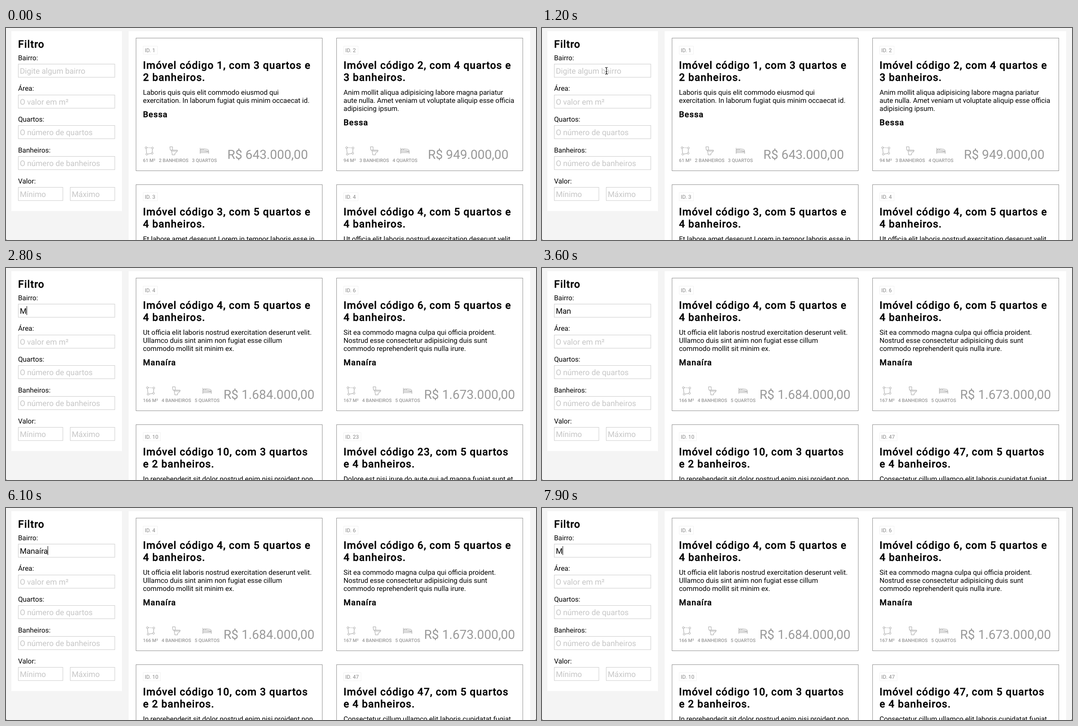
These frames come from a looping animation (1184 by 473 pixels, 8 s). An HTML page:

```html
<!DOCTYPE html>
<html lang="pt-BR">
<head>
<meta charset="utf-8">
<title>Filtro de imóveis</title>
<style>
  html, body { margin: 0; width: 100%; height: 100%; overflow: hidden; background: #f4f4f4; }
  svg { display: block; width: 1184px; height: 473px; font-family: Roboto, sans-serif; }
  text { white-space: pre; font-size: 15.43px; fill: #000; text-rendering: geometricPrecision; }
  .title, .area { font-weight: 500; letter-spacing: .965px; stroke: #000; stroke-width: .4px; }
  .title { font-size: 23.16px; }
  .area { font-size: 18.4px; }
  .input { font-size: 17.2px; }
  .hint { font-size: 17.37px; fill: #c6c6c6; }
  .id { font-size: 12px; fill: #888; }
  .fact { font-size: 10.5px; font-weight: 500; fill: #999; }
  .price { font-size: 28.2px; fill: #999; }
  .icon { fill: none; stroke: #a2a2a2; stroke-width: 1; }
</style>
</head>
<body>
<svg id="stage" viewBox="0 0 1184 473"></svg>
<script>
const LOOP = 8000;
const stage = document.getElementById('stage');

function add(parent, tag, attrs = {}, content) {
  const el = document.createElementNS('http://www.w3.org/2000/svg', tag);
  for (const k in attrs) el.setAttribute(k, attrs[k]);
  if (content !== undefined) el.textContent = content;
  parent.appendChild(el);
  return el;
}
const group = (parent, x = 0, y = 0) => add(parent, 'g', { transform: `translate(${x} ${y})` });
const label = (parent, cls, x, y, str) => add(parent, 'text', { class: cls, x, y }, str);
const box = (parent, x, y, width, height, stroke) =>
  add(parent, 'rect', { x, y, width, height, fill: '#fff', stroke: stroke || 'none' });
const show = (el, on) => el.setAttribute('visibility', on ? 'visible' : 'hidden');

// Icons are drawn around their own centre
const ICONS = [
  g => {
    const pts = [[-7, -7], [7.4, -6.4], [6.8, 5.6], [-5.4, 7.6]];
    add(g, 'path', { d: 'M-4.8-7.2L5.2-6.6', 'stroke-dasharray': '2 1.2' });
    add(g, 'path', { d: 'M7.2-4.2L6.9 3.4M4.6 6L-3.2 7.2M-5.7 5.4L-6.8-4.8' });
    for (const [cx, cy] of pts) add(g, 'circle', { cx, cy, r: 2 });
  },
  g => add(g, 'path', {
    d: 'M-8.5-9H-2.5V-1.5H-7.5ZM-5.5-1.5H8.5V.8H-4.5ZM7.8 .8Q7 4.5 2.8 5.2V9H-3.5V5Q-4.8 3-4.8 .8'
  }),
  g => add(g, 'path', {
    d: 'M-9.5-6.5V6.5M-9.5 4H9.5M9.5 6.5V1.2L-1-1.5H-9.5M-9.5 1.5H9.5M-7.5-1.8V-4.2H-3V-1.8M-2.5-4.5L7-3.2Q9.3-2.6 9.4 1'
  })
];

const LINE = 18.33;

function card(parent, x, y, c) {
  const g = group(parent, x, y);
  box(g, .5, .5, 416, 296, '#909090');

  const badge = box(g, 16.5, 18.5, 32, 18, '#f1f1f1');
  const id = label(g, 'id', 20, 31.7, 'ID. ' + c.id);
  badge.setAttribute('width', id.getComputedTextLength() + 8.5);

  const tail = `${c.baths} banheiros.`;
  const long = c.id > 9;
  label(g, 'title', 16, 69, `Imóvel código ${c.id}, com ${c.rooms} quartos${long ? '' : ' e'}`);
  label(g, 'title', 16, 96, long ? 'e ' + tail : tail);

  c.text.forEach((line, i) => label(g, '', 16, 126.8 + i * LINE, line));
  if (!c.price) return;
  label(g, 'area', 16, 140 + c.text.length * LINE, c.area);

  let left = 16;
  [`${c.size} M²`, `${c.baths} BANHEIROS`, `${c.rooms} QUARTOS`].forEach((str, i) => {
    const w = label(g, 'fact', left, 277.2, str).getComputedTextLength();
    const icon = group(g, left + w / 2, 252);
    icon.setAttribute('class', 'icon');
    ICONS[i](icon);
    left += w + 7.8;
  });
  const price = label(g, 'price', (left - 7.8 + 408) / 2, 270, 'R$ ' + c.price);
  price.setAttribute('text-anchor', 'middle');
}

const HOMES = [
  { id: 1, rooms: 3, baths: 2, size: 61, price: '643.000,00', area: 'Bessa', text: [
    'Laboris quis quis elit commodo eiusmod qui',
    'exercitation. In laborum fugiat quis minim occaecat id.'] },
  { id: 2, rooms: 4, baths: 3, size: 94, price: '949.000,00', area: 'Bessa', text: [
    'Anim mollit aliqua adipisicing labore magna pariatur',
    'aute nulla. Amet veniam ut voluptate aliquip esse officia',
    'adipisicing ipsum.'] },
  { id: 3, rooms: 5, baths: 4, text: ['Et labore amet deserunt Lorem in tempor laboris esse in'] },
  { id: 4, rooms: 5, baths: 4, size: 166, price: '1.684.000,00', area: 'Manaíra', text: [
    'Ut officia elit laboris nostrud exercitation deserunt velit.',
    'Ullamco duis sint anim non fugiat esse cillum',
    'commodo mollit sit minim ex.'] },
  { id: 6, rooms: 5, baths: 4, size: 167, price: '1.673.000,00', area: 'Manaíra', text: [
    'Sit ea commodo magna culpa qui officia proident.',
    'Nostrud esse consectetur adipisicing duis sunt',
    'commodo reprehenderit quis nulla irure.'] },
  { id: 10, rooms: 3, baths: 2, text: ['In reprehenderit sit dolor nostrud enim nisi proident non'] },
  { id: 23, rooms: 5, baths: 4, text: ['Dolore est nisi irure do aute qui ad magna fugiat sunt et'] },
  { id: 47, rooms: 5, baths: 4, text: ['Consectetur cillum ullamco elit laboris cupidatat fugiat'] }
];

function results(...ids) {
  const g = group(stage);
  ids.forEach((id, i) =>
    card(g, 290 + (i % 2) * 448, 22 + (i >> 1) * 327, HOMES.find(h => h.id === id)));
  return g;
}

function field(x, y, w, hint) {
  box(stage, x + .5, y + .5, w, 29.5, '#cbcbcb');
  return label(stage, 'hint', x + 3.9, y + 21.5, hint);
}

// Page
add(stage, 'rect', { width: 1184, height: 473, fill: '#f4f4f4' });
box(stage, 12, 7, 247, 401.5);
box(stage, 274, 7, 897, 466);
label(stage, 'title', 27, 43.6, 'Filtro');

const ROW = 68.75;
const rowY = i => Math.round(79.9 + i * ROW);
['Bairro:', 'Área:', 'Quartos:', 'Banheiros:', 'Valor:'].forEach((s, i) =>
  label(stage, '', 27, 71.5 + i * ROW, s));
const hint = field(27, rowY(0), 215.5, 'Digite algum bairro');
['O valor em m²', 'O número de quartos', 'O número de banheiros'].forEach((s, i) =>
  field(27, rowY(i + 1), 215.5, s));
field(27, rowY(4), 99.5, 'Mínimo');
field(143, rowY(4), 99.5, 'Máximo');

const lists = [
  { from: 0, el: results(1, 2, 3, 4) },
  { from: 2800, el: results(4, 6, 10, 23) },
  { from: 3000, el: results(4, 6, 10, 47) }
];

const typed = label(stage, 'input', 31, 101.5, '');
const caret = add(stage, 'rect', { y: 85, width: 1, height: 20 });

const beam = group(stage);
const BEAM = 'M-3-7.5Q0-7.5 0-5.5Q0-7.5 3-7.5M0-5.5V5.5M-3 7.5Q0 7.5 0 5.5Q0 7.5 3 7.5M-2 2H2';
add(beam, 'path', { d: BEAM, fill: 'none', stroke: '#fff', 'stroke-width': 2.6 });
add(beam, 'path', { d: BEAM, fill: 'none', stroke: '#000', 'stroke-width': 1.2 });
const arrow = group(stage);
add(arrow, 'path', { d: 'M0 0V15L3.5 11.8L6 17.5L8.3 16.5L5.9 11H10.6Z', stroke: '#fff' });

// Rounded window corners
add(stage, 'path', { d: 'M0 470Q0 473 3 473H0ZM1184 470Q1184 473 1181 473H1184Z', fill: '#555' });

// [time, letters in the field]
const WORD = 'Manaíra';
const KEYS = [[1800, 0], [2600, 1], [2900, 2], [3100, 3], [3900, 4], [4500, 5], [4700, 6], [5100, 7],
  [7000, 6], [7200, 5], [7400, 4], [7600, 3], [7800, 2], [7900, 1]];

function pointer(t) {
  if (t >= 1200) return [144, 95.5];
  const rest = (1 - Math.min(1, (t - 100) / 900)) ** 3;
  return [148 + 552 * rest, 104 + 366 * rest];
}

function draw(time) {
  const t = Math.floor(time / 100) * 100;

  const [x, y] = pointer(t);
  const inField = x < 243 && y < 110;
  const visible = t >= 100 && t < 2600;
  beam.setAttribute('transform', `translate(${x} ${y})`);
  arrow.setAttribute('transform', `translate(${x} ${y})`);
  show(beam, visible && inField);
  show(arrow, visible && !inField);

  const key = KEYS.filter(k => k[0] <= t).pop();
  const count = key ? key[1] : 0;
  typed.textContent = WORD.slice(0, count);
  show(hint, !count);
  const width = count ? typed.getComputedTextLength() : 1;
  caret.setAttribute('x', Math.floor(31.15 + width));
  show(caret, key && Math.floor((t - key[0]) / 500) % 2 === 0);

  const current = lists.filter(l => l.from <= t).pop();
  for (const l of lists) show(l.el, l === current);
}

let start;
function tick(now) {
  if (start === undefined) start = now;
  draw((now - start) % LOOP);
  requestAnimationFrame(tick);
}
draw(0);
requestAnimationFrame(tick);
</script>
</body>
</html>
```
